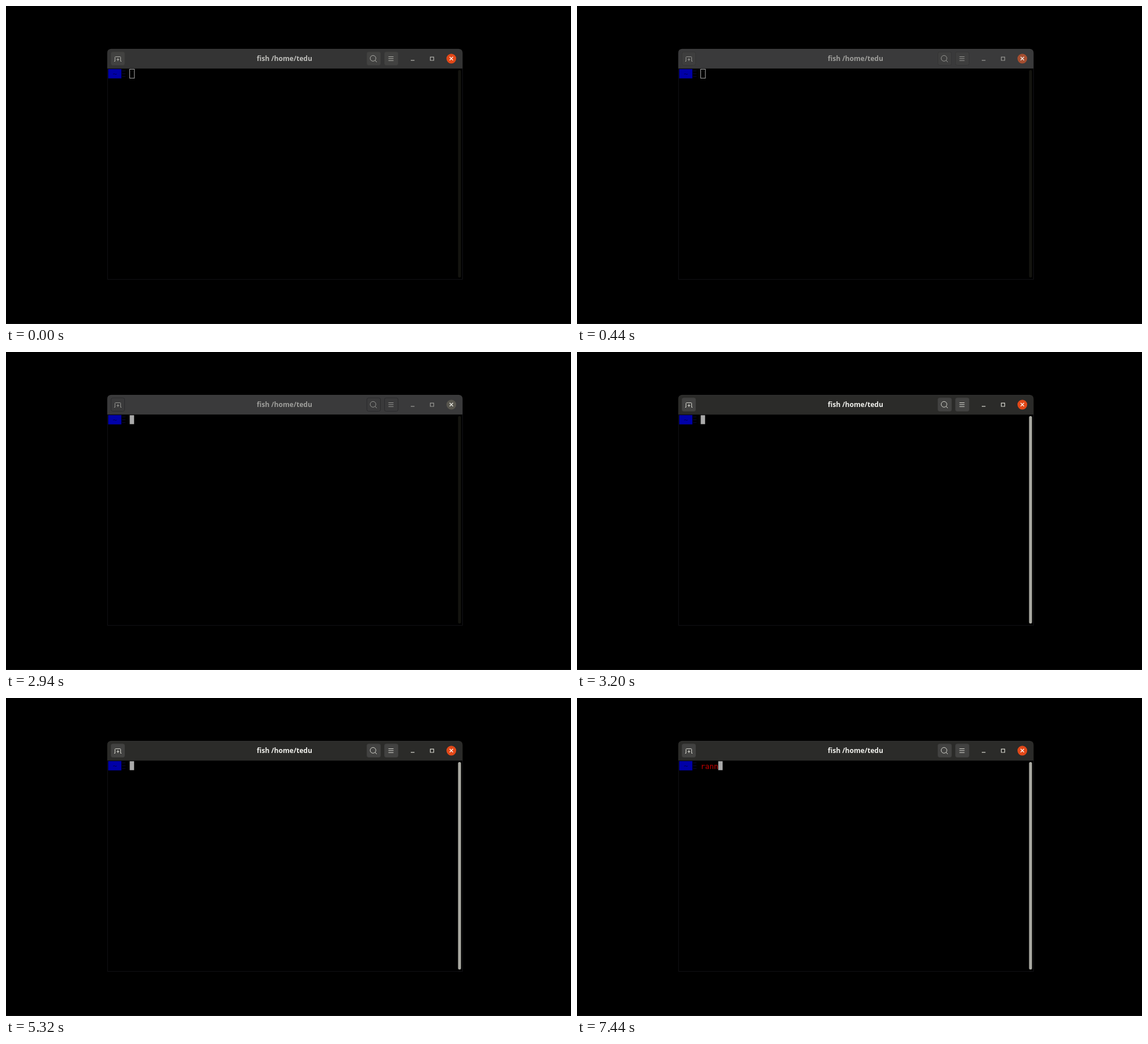
These frames come from a looping animation (998x561 px, 8000 ms). An HTML page:

```html
<!DOCTYPE html>
<html lang="en">
<head>
<meta charset="utf-8">
<title>Terminal</title>
<style>
  html, body { margin: 0; width: 100%; height: 100%; overflow: hidden; background: #000; }
  svg { display: block; width: 998px; height: 561px; }
  .bar { fill: var(--bar); }
  .title { fill: var(--title); font: 700 12.1px "Open Sans", "Noto Sans", sans-serif; text-anchor: middle; }
  .button { fill: var(--button); stroke: var(--edge); }
  .icon { fill: none; stroke: var(--icon); }
  .close { fill: var(--close); }
  .cross { stroke: var(--cross); stroke-width: 1.5; }
  .scroll { fill: var(--scroll); }
  .mono { font: 12.875px "DejaVu Sans Mono", monospace; white-space: pre; }
</style>
</head>
<body>
<svg viewBox="0 0 998 561">
  <rect width="998" height="561"/>
  <path d="M0 560.5H998" stroke="#101010"/>
  <path d="M179.3 110V482.3H806.5V110" fill="none" stroke="#131317"/>

  <path class="bar" d="M178.8 110V83q0-7.3 7-7.3H799.5q7 0 7 7.3V110z"/>
  <path d="M184 76.3H801" stroke="#fff" stroke-opacity=".06"/>
  <path d="M179 110.5H806" stroke="#121212"/>
  <text class="title" x="492" y="97">fish /home/tedu</text>

  <g class="button">
    <rect x="185.5" y="81" width="24" height="23.5" rx="3"/>
    <rect x="637.5" y="81" width="24" height="23.5" rx="3"/>
    <rect x="668.5" y="81" width="24" height="23.5" rx="3"/>
  </g>
  <g class="icon">
    <path d="M191 97.5H192.5V90.5q0-1 1-1H201.5q1 0 1 1V97.5H204M195.5 94.5H200M197.7 92V97"/>
    <circle cx="648.3" cy="92.3" r="5"/>
    <path d="M652 96L655 99M675.5 89.5H684.5M675.5 92.8H684.5M675.5 96.3H684.5"/>
    <path d="M715 95.8H721.5M749.5 90.1H755.5V96H749.5z" stroke-width="1.2"/>
  </g>
  <circle class="close" cx="786.6" cy="92.8" r="8.6"/>
  <path class="cross" d="M783.6 89.8L789.6 95.8M789.6 89.8L783.6 95.8"/>

  <rect class="scroll" x="798.5" y="113" width="5.2" height="366" rx="2.5"/>

  <rect x="180.5" y="111.3" width="23.3" height="16.4" fill="#0000a8"/>
  <text class="mono" x="188.5" y="124" fill="#000050">~</text>
  <path d="M205 114.5H211M205 119.5H211M205 124.5H211" stroke="#0a0a34"/>

  <text class="mono" x="218.5" y="125"><tspan id="typed" fill="#a80000" stroke="#a80000" stroke-width=".3"></tspan><tspan id="hint" fill="#555"></tspan></text>
  <rect id="cursor" y="111.5" height="15.8"/>
  <text id="under" class="mono" y="125" fill="#000"></text>
</svg>
<script>
const LOOP = 8000, LEFT = 218.5, CELL = 7.75;
const SUGGESTION = "ranger Pictures";
const KEYS = [[5340, "r"], [6180, "a"], [6700, "n"], [7140, "n"]];

// name: [focused colour, unfocused colour, fades slowly]
const COLORS = {
  bar:    [[43, 43, 41], [58, 58, 59]],
  title:  [[240, 240, 236], [158, 158, 155]],
  icon:   [[216, 216, 208], [152, 152, 148]],
  scroll: [[170, 170, 162], [20, 20, 15]],
  button: [[66, 66, 65], [58, 58, 59], true],
  edge:   [[60, 60, 59], [42, 42, 44], true],
  close:  [[226, 72, 24], [88, 86, 78], true],
  cross:  [[250, 240, 235], [225, 225, 218], true]
};

const $ = id => document.getElementById(id);
const root = document.documentElement;
const ramp = (t, a, b) => Math.min(1, Math.max(0, (t - a) / (b - a)));
const mix = (a, b, p) => `rgb(${a.map((v, i) => Math.round(v + (b[i] - v) * p))})`;

function set(el, attrs) {
  for (const key in attrs) el.setAttribute(key, attrs[key]);
}

function drawColors(t) {
  const back = ramp(t, 2950, 3190);
  const fast = ramp(t, -600, 400) * (1 - back);
  const slow = ramp(t, 0, 1000) * (1 - back);
  for (const name in COLORS) {
    const [on, off, late] = COLORS[name];
    const scrollGone = name === "scroll" && t < 2900;
    const p = scrollGone ? 1 : late ? slow : fast;
    root.style.setProperty("--" + name, mix(on, off, p));
  }
}

function drawLine(t) {
  const text = KEYS.filter(k => t >= k[0]).map(k => k[1]).join("");
  const hinted = t >= 5440 && SUGGESTION.startsWith(text);
  const rest = hinted ? SUGGESTION.slice(text.length) : "";
  const x = LEFT + text.length * CELL;
  const focused = t >= 2680;
  const hidden = t >= 4600 && t < 5320;

  $("typed").textContent = text;
  $("hint").textContent = rest;
  set($("cursor"), {
    x, width: focused ? CELL : CELL + 0.5,
    fill: focused ? "#aaa" : "none",
    stroke: focused ? "none" : "#aaa",
    visibility: hidden ? "hidden" : "visible"
  });
  $("under").textContent = rest.charAt(0);
  set($("under"), { x });
}

const start = performance.now();

function frame() {
  const t = (performance.now() - start) % LOOP;
  drawColors(t);
  drawLine(t);
  requestAnimationFrame(frame);
}
frame();
</script>
</body>
</html>
```
